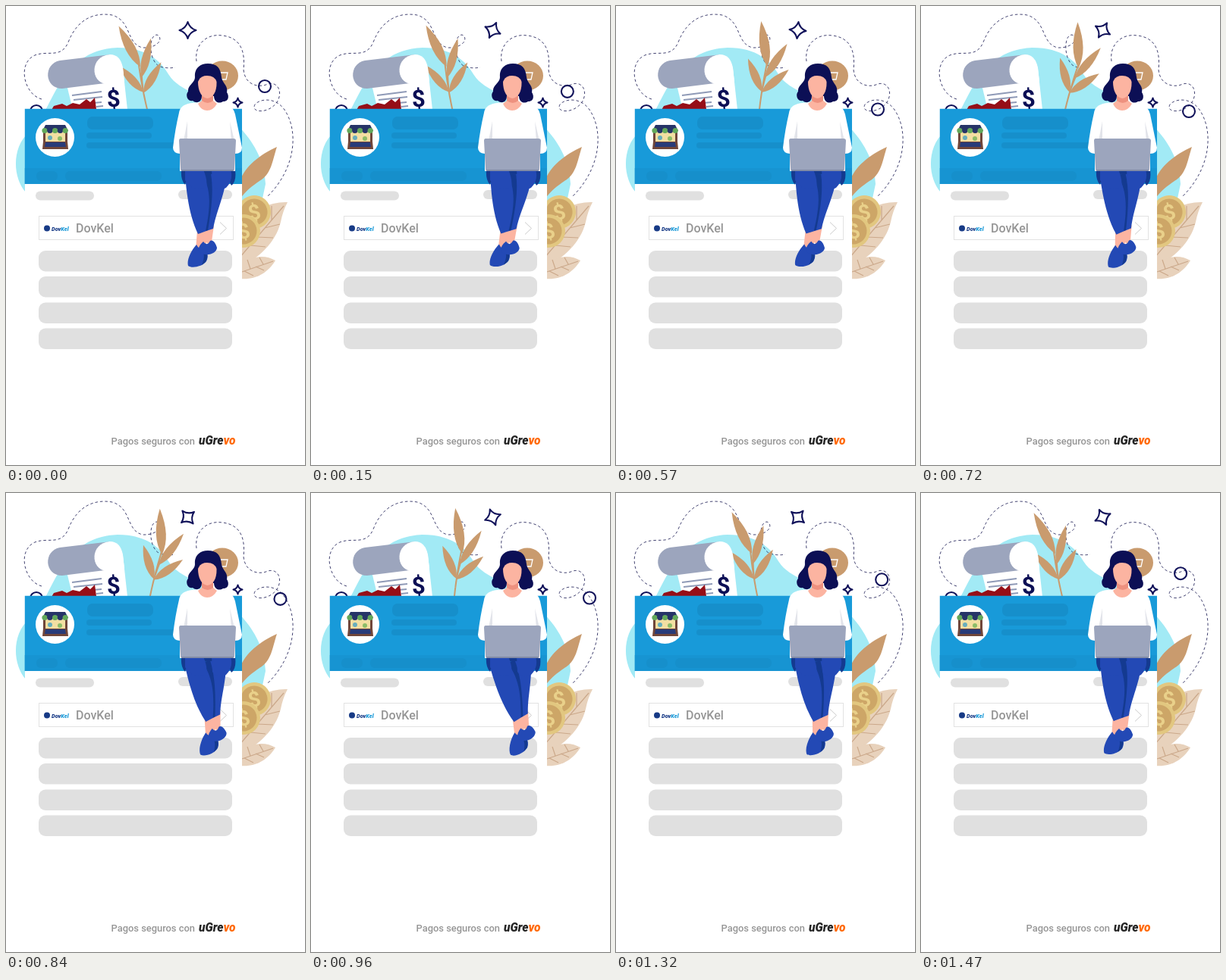
Recreate the animation shown at these times as an HTML page. Size 394 by 606 pixels, loop 1.5 s.

```html
<!DOCTYPE html>
<html lang="es">
<head>
<meta charset="utf-8">
<title>Pagos seguros</title>
<style>
  html, body { margin: 0; width: 100%; height: 100%; overflow: hidden; background: #fff; }
  svg { display: block; }
  text { font-family: Roboto, sans-serif; }
  .dash { fill: none; stroke: #15154f; stroke-width: .8; stroke-dasharray: 3.5 3; }
  .navy { fill: none; stroke: #11125a; stroke-width: 2.1; stroke-linejoin: round; }
  .brown { fill: #c99b6e; }
  .sand { fill: #e8d2bc; }
  .vein { fill: none; stroke: #cba88a; stroke-width: 1.2; }
  .gray { fill: #e0e0e0; }
  .shade { fill: #168fcb; }
  .skin { fill: #fcb4a1; }
  .jean { fill: #2349b5; }
  .deep { fill: #143a90; }
  .label { font-weight: 500; fill: #969696; }
  .bold { font-weight: 700; text-anchor: middle; }
  .brand { font-weight: 900; font-style: italic; }
</style>
</head>
<body>
<svg width="394" height="606" viewBox="0 0 394 606">
  <path fill="#a2eaf5" d="M26 246C8 226 8 186 30 167C62 145 66 58 147 55C186 55 204 73 214 90C222 103 234 108 248 116C285 136 340 175 342 235L338 254L300 270H60Z"/>

  <path class="dash" d="M47 123C24 117 14 76 38 65C56 58 72 70 82 48C94 16 118 8 140 12C166 20 158 50 180 55C201 56 208 42 199 38C187 38 188 74 203 80Q213 83 223 81"/>
  <path class="dash" d="M251 73C248 50 265 36 285 39C312 42 315 64 313 84C315 106 335 108 345 103C359 99 365 115 357 127C347 142 322 142 328 130C335 122 355 120 367 137C386 165 382 215 344 252"/>

  <g id="plant">
    <path d="M188 145Q191 108 197 76M190 124Q191 110 197 88" fill="none" stroke="#c99b6e" stroke-width="2"/>
    <path class="brown" data-leaf="188 20 198 80 13"/>
    <path class="brown" data-leaf="223 49 195 94 11"/>
    <path class="brown" data-leaf="172 70 191 113 11"/>
    <path class="brown" data-leaf="226 83 191 114 11"/>
  </g>

  <!-- receipt -->
  <path fill="#fff" d="M79 100L88 137H160L154 82Q150 65 134 65Z"/>
  <path fill="#9ca5bd" d="M138 64L71 72C49 76 50 109 74 109L130 102Z"/>
  <path fill="#fff" d="M137 64C110 66 111 101 132 103L156 100L154 82Q151 64 137 64Z"/>
  <path d="M87 118L126 113M89 124L127 120M104 129L126 127M119 133L128 132" stroke="#8f9ab7" stroke-width="2"/>
  <path fill="#960e17" d="M60 137L63 132L74 129L80 132L88 128L97 130L106 123L111 127L117 121L119 136Z"/>
  <text class="bold" x="141.500" y="133" font-size="31" fill="#0c0f55" transform="rotate(-4 141 122)">$</text>
  <circle class="navy" cx="40" cy="139" r="8"/>

  <!-- leaves and coins -->
  <path class="brown" d="M357 186C335 196 314 212 308 232V255C318 242 324 238 334 231C350 222 351 204 357 186Z"/>
  <path class="sand" d="M371 259C350 258 322 268 308 300V347C332 332 355 314 362 285Q365 270 371 259Z"/>
  <path class="vein" d="M366 264L308 332M350 282V264M341 293L361 288M331 305L352 306M322 316L342 318"/>
  <path class="sand" d="M355 336C342 328 324 329 308 342V360C330 362 345 352 355 336Z"/>
  <path class="vein" d="M352 337L308 352M339 341L334 332M329 344L340 349M322 347L318 335M314 350L326 356"/>
  <g id="coins"></g>

  <!-- card -->
  <path fill="#fff" d="M25 235H311V606H25Z"/>
  <path fill="#189ad9" d="M24.800 135.700H311V235H24.800Z"/>
  <path fill="#1794d2" d="M24.800 214H311V235H24.800Z"/>
  <g class="shade">
    <rect x="107" y="146" width="87" height="17" rx="7"/>
    <rect x="106" y="167" width="86" height="8" rx="4"/>
    <rect x="106" y="180" width="130" height="8" rx="4"/>
    <rect x="40" y="218" width="28" height="13" rx="6"/>
    <rect x="78" y="218" width="127" height="13" rx="6"/>
  </g>
  <circle cx="64.500" cy="173.500" r="25.500" fill="#fff"/>
  <path fill="#f3dfa2" d="M51 165H79V180H51Z"/>
  <path fill="#70463a" d="M49 164H52V180H49ZM78 164H81V180H78ZM49 179H81L82 189H48Z"/>
  <path fill="#283b78" d="M52 180H78L79 186H51Z"/>
  <circle cx="58" cy="174" r="3" fill="#67aebd"/>
  <circle cx="71" cy="175" r="3" fill="#8dbd68"/>
  <path fill="#263467" d="M52 157H78L82 165H48Z"/>
  <g id="awning"></g>

  <g class="gray">
    <rect x="39" y="244.500" width="77" height="12" rx="6"/>
    <rect x="227" y="243" width="71" height="12" rx="6"/>
    <rect x="43" y="323" width="255" height="27.500" rx="9"/>
    <rect x="43" y="357" width="255" height="27.500" rx="9"/>
    <rect x="43" y="391.500" width="255" height="27.500" rx="9"/>
    <rect x="43" y="425.500" width="255" height="27.500" rx="9"/>
  </g>
  <rect x="43.500" y="277.500" width="256" height="31" fill="#fff" stroke="#e2e2e2"/>
  <path d="M282 285.500L290.500 293.500L282 301.500" fill="none" stroke="#ccc"/>
  <circle cx="54" cy="293.500" r="4" fill="#173a86"/>
  <text class="brand" x="60" y="296.500" font-size="7.400" fill="#173a86">Dov<tspan fill="#1b9ad8">Kel</tspan></text>
  <text class="label" x="92" y="299" font-size="16">DovKel</text>
  <text class="label" x="138.500" y="578.500" font-size="12.900">Pagos seguros con</text>
  <text class="brand" x="254" y="578.500" font-size="15.500" fill="#252525">uGre<tspan fill="#ff6a0c">vo</tspan></text>

  <!-- speech bubble, stars and ring -->
  <ellipse class="brown" cx="285" cy="92" rx="21" ry="19.500"/>
  <path d="M279 88H292L290 97H283" fill="none" stroke="#fff" stroke-width="1.300"/>
  <path id="star" class="navy" d="M0-11Q2.500-2.500 11 0Q2.500 2.500 0 11Q-2.500 2.500-11 0Q-2.500-2.500 0-11Z"/>
  <path class="navy" transform="translate(305.500 127.500)" d="M0-6Q1-1 6 0Q1 1 0 6Q-1 1-6 0Q-1-1 0-6Z"/>
  <circle id="ring" class="navy" r="8"/>

  <!-- woman -->
  <g id="legs">
    <path class="skin" d="M252 296L250 322L260 326L264 312L270 318L274 290Z"/>
    <path class="jean" d="M251 315C243 324 238 336 240 343C245 347 259 344 264 337C268 329 264 321 261 319Q255 323 251 315Z"/>
    <path class="deep" d="M259 319C264 322 268 329 263 338L258 342C262 332 262 326 257 321Z"/>
    <path class="jean" d="M260 311C252 318 252 325 258 327C268 331 278 325 278 319C276 312 272 308 269 310Q265 318 260 311Z"/>
    <path class="jean" d="M236 222C238 250 242 278 253 301L264 297L273 294C277 272 284 260 290 232L288 222Z"/>
    <path class="deep" d="M259 222C267 238 272 254 263 297L266 296C270 272 274 246 270 222Z"/>
  </g>
  <path class="deep" d="M231 216H302Q304 232 297 237L290 222H240L236 236Q230 230 231 216Z"/>
  <path class="jean" d="M236 216H260Q266 230 264 240Q246 246 236 230ZM271 216H296Q300 230 290 240Q278 246 272 236Z"/>

  <path fill="#fff" d="M254 127C242 128 230 129 228 141Q223 162 220 187Q220 194 229 195V218H302V195Q311 195 311 187L302 143C299 130 288 128 276 127Z"/>
  <path fill="#e2e4ea" d="M239 152L234 178H239ZM295 152L297 180L301 178Z"/>
  <path fill="#0c0f55" d="M266 76C254 76 248 84 249 94C249 102 239 104 240 113C236 117 239 127 246 125C252 130 258 126 258 119H274C274 126 280 130 286 126C294 126 294 118 291 114C293 105 285 102 284 94C283 82 278 76 266 76Z"/>
  <path class="skin" d="M258 115H273V125L278 129Q273 138 265 138Q257 138 253 129L258 125Z"/>
  <path fill="#ee917f" d="M258 117H273V125Q266 131 258 125Z"/>
  <path class="skin" d="M265 92Q256 92 253 100C253 113 258 121 265.500 122C273 121 278 113 277.500 100Q275 92 265 92Z"/>
  <path fill="#9ca5bd" d="M230 175H300Q303 175 303 178L301 215Q301 218 298 218H233Q230 218 230 215L228 178Q228 175 230 175Z"/>
  <path d="M231 217H300" stroke="#69728f"/>
</svg>
<script>
  const LOOP = 1500, STEP = 30;
  const $ = id => document.getElementById(id);

  // A leaf is given by its tip, base and width; it is fullest near the base.
  for (const leaf of document.querySelectorAll('[data-leaf]')) {
    const [x1, y1, x2, y2, width] = leaf.dataset.leaf.split(' ').map(Number);
    const length = Math.hypot(x2 - x1, y2 - y1);
    const nx = (y1 - y2) / length * width, ny = (x2 - x1) / length * width;
    const mx = x1 + (x2 - x1) * .6, my = y1 + (y2 - y1) * .6;
    leaf.setAttribute('d', `M${x1} ${y1}Q${mx + nx} ${my + ny} ${x2} ${y2}Q${mx - nx} ${my - ny} ${x1} ${y1}Z`);
  }

  const coin = (x, y) => `<g transform="translate(${x} ${y}) rotate(-14)">
    <circle r="22" fill="#e2c780"/><circle r="17.5" fill="#cda667"/>
    <text class="bold" y="10" font-size="28" fill="#e9d08a">$</text></g>`;
  $('coins').innerHTML = coin(327, 272) + coin(313, 297);

  $('awning').innerHTML = [0, 1, 2, 3, 4].map(i =>
    `<circle cx="${51 + i * 6.8}" cy="164.5" r="3.6" fill="${i % 2 ? '#263467' : '#62a85a'}"/>`).join('');

  // Smooth periodic curve through [time, value] keys.
  function track(keys, time) {
    const n = keys.length;
    const key = i => {
      const lap = Math.floor(i / n), [at, value] = keys[i - lap * n];
      return [at + lap * LOOP, value];
    };
    let i = n - 1;
    while (keys[i][0] > time) i--;
    const [a, b, c, d] = [i - 1, i, i + 1, i + 2].map(key);
    const span = c[0] - b[0], u = (time - b[0]) / span;
    const m1 = (c[1] - a[1]) / (c[0] - a[0]) * span;
    const m2 = (d[1] - b[1]) / (d[0] - b[0]) * span;
    const rise = c[1] - b[1];
    return b[1] + u * (m1 + u * (3 * rise - 2 * m1 - m2 + u * (m1 + m2 - 2 * rise)));
  }

  const sway = [[0, -18.4], [330, -12.2], [570, 1.5], [750, 8.8], [960, 1], [1200, -13]];
  const swing = [[0, 0], [330, 3.1], [570, 1.9], [720, -3.4], [960, -11.3], [1200, -9.2]];
  const ringX = [[0, 341], [330, 337.5], [570, 345], [720, 353], [960, 367], [1200, 357]];
  const ringY = [[0, 106], [330, 126], [570, 136.5], [720, 139], [960, 138.5], [1200, 123]];

  function draw(now) {
    const time = Math.floor(now % LOOP / STEP) * STEP;
    const pose = (id, value) => $(id).setAttribute('transform', value);
    pose('plant', `rotate(${track(sway, time)} 188 145)`);
    pose('legs', `rotate(${track(swing, time)} 266 228)`);
    pose('ring', `translate(${track(ringX, time)} ${track(ringY, time)})`);
    pose('star', `translate(239.5 32) rotate(${time / 6})`);
    requestAnimationFrame(draw);
  }
  draw(performance.now());
</script>
</body>
</html>
```
